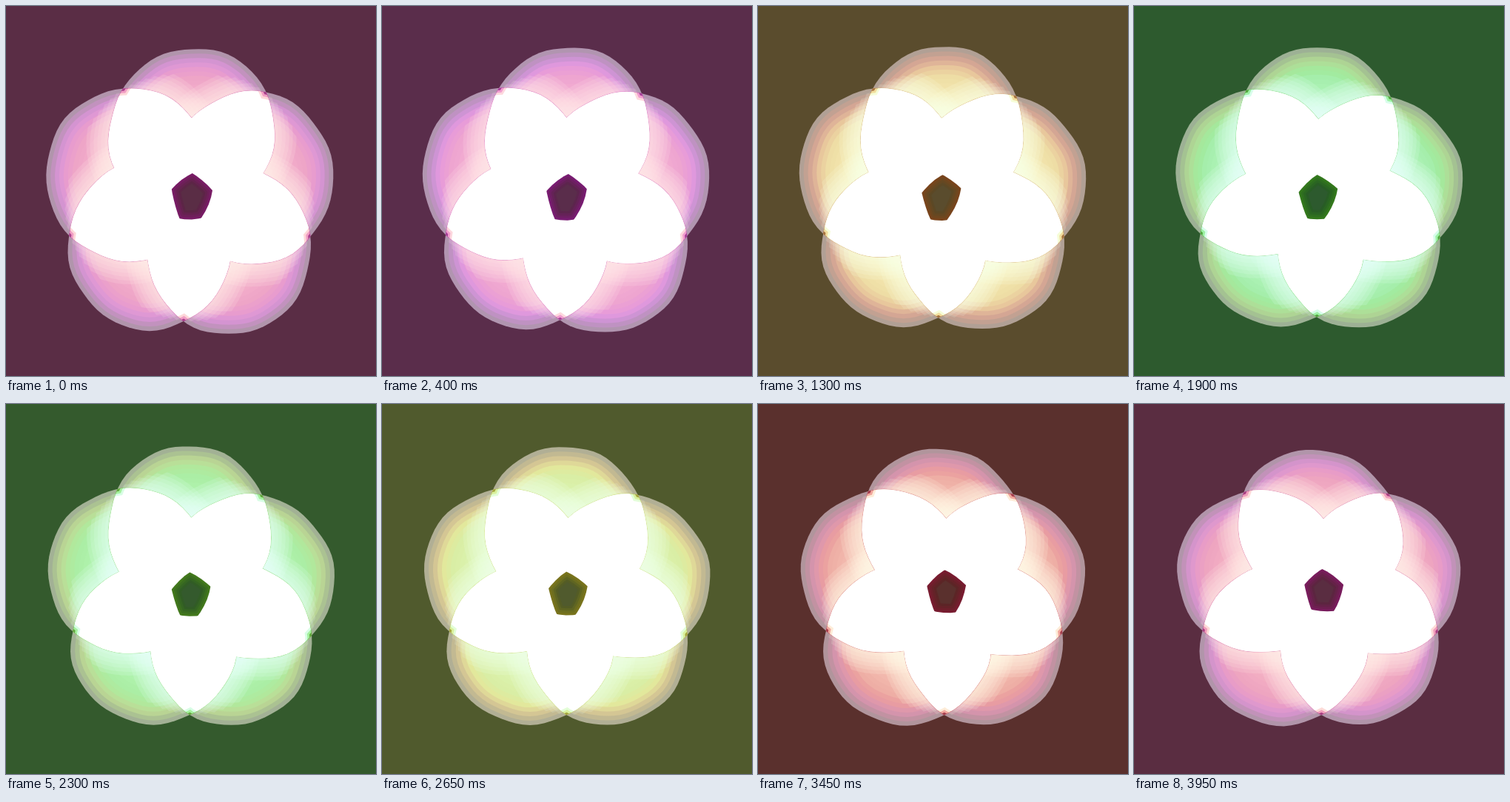
These frames come from a looping animation (500x500 px, 4 s). An HTML page with a canvas:

```html
<!DOCTYPE html>
<html lang="en">
<head>
<meta charset="utf-8">
<title>Breathing blossom</title>
<style>
  html, body { margin: 0; width: 100%; height: 100%; overflow: hidden; background: #582d44; }
  canvas { display: block; width: 500px; height: 500px; }
</style>
</head>
<body>
<canvas id="stage" width="500" height="500"></canvas>
<script>
const ctx = document.getElementById('stage').getContext('2d');
const LOOP = 4000, STEP = 50, TAU = Math.PI * 2;

const hueTimes = [0, 850, 1300, 1900, 2300, 3000, 3950];
const hues = [-32, -35, 42, 121, 111, 34, -26];

// Petals clockwise from the top: [left, top, right, bottom] at each time.
const poseTimes = [0, 850, 1900, 3950];
const petals = [
  { box: [[139, 57, 363, 287], [140, 54, 360, 289], [138, 55, 357, 287], [141, 62, 362, 279]], skew: [-2.5, -2, 0, 6] },
  { box: [[222, 115, 442, 349], [218, 118, 442, 348], [219, 122, 444, 346], [228, 122, 441, 339]], skew: [0, 1.5, 2.5, 1] },
  { box: [[190, 214, 412, 444], [190, 216, 414, 439], [194, 213, 414, 435], [198, 211, 412, 433]], skew: [0, 0, 0, 0] },
  { box: [[84, 209, 304, 438], [85, 213, 306, 434], [87, 218, 310, 432], [89, 214, 316, 434]], skew: [0, 0, 0, -2] },
  { box: [[54, 111, 280, 345], [55, 110, 276, 341], [56, 113, 277, 338], [58, 117, 285, 336]], skew: [0, 0, 0, 0] }
];

// Colour of a petal by depth from its rim: depth, hue shift, saturation, lightness.
const shades = [
  [0, -18, 15, 64], [7, -24, 30, 67], [14, -26, 47, 72], [24, -8, 62, 76],
  [36, 4, 68, 79], [60, 8, 74, 82], [85, 14, 80, 86]
];

const hsl = (h, s, l, a = 1) => `hsla(${(h + 360) % 360}, ${s}%, ${l}%, ${a})`;
const mix = (a, b, k) => a + (b - a) * k;

// Smooth curve through the given points.
function curve(times, vals, t) {
  const last = times.length - 1;
  let i = 0;
  while (i < last - 1 && t > times[i + 1]) i++;
  const slope = n => {
    const a = Math.max(n - 1, 0), b = Math.min(n + 1, last);
    return (vals[b] - vals[a]) / (times[b] - times[a]);
  };
  const span = times[i + 1] - times[i], u = (t - times[i]) / span;
  const u2 = u * u, u3 = u2 * u;
  return (2 * u3 - 3 * u2 + 1) * vals[i] + (u3 - 2 * u2 + u) * span * slope(i)
    + (3 * u2 - 2 * u3) * vals[i + 1] + (u3 - u2) * span * slope(i + 1);
}

function shadeAt(depth, hue) {
  let i = 0;
  while (i < shades.length - 2 && depth > shades[i + 1][0]) i++;
  const a = shades[i], b = shades[i + 1];
  const k = Math.min((depth - a[0]) / (b[0] - a[0]), 1);
  return hsl(hue + mix(a[1], b[1], k), mix(a[2], b[2], k), mix(a[3], b[3], k));
}

function pose(petal, n, t) {
  const [l, top, r, b] = [0, 1, 2, 3].map(k => curve(poseTimes, petal.box.map(q => q[k]), t));
  return {
    x: (l + r) / 2, y: (top + b) / 2, rx: (r - l) / 2, ry: (b - top) / 2,
    skew: curve(poseTimes, petal.skew, t), phase: n * 1.9 + t / 4000
  };
}

// Petal outline, moved inwards by the inset (outwards when negative).
function outline(p, inset = 0) {
  const path = new Path2D(), k = 1 - inset / ((p.rx + p.ry) / 2);
  for (let i = 0; i < 72; i++) {
    const a = i / 72 * TAU, c = Math.cos(a), s = Math.sin(a);
    const bump = p.skew * Math.sin(2 * a) + 0.9 * Math.sin(5 * a + p.phase) + 0.6 * Math.sin(9 * a - p.phase);
    path.lineTo(p.x + (p.rx + bump) * k * c, p.y + (p.ry + bump) * k * s);
  }
  path.closePath();
  return path;
}

function clipped(clips, draw) {
  ctx.save();
  clips.forEach(c => ctx.clip(c));
  draw();
  ctx.restore();
}

function fill(path, color) {
  ctx.fillStyle = color;
  ctx.fill(path);
}

function render(t) {
  const hue = curve(hueTimes, hues, t);
  const back = hsl(hue, 33, 26.5);
  const blobs = petals.map((p, n) => pose(p, n, t));
  const rims = blobs.map(b => outline(b));
  const pairs = [];
  blobs.forEach((_, i) => pairs.push([i, (i + 1) % 5], [(i + 1) % 5, i]));

  ctx.fillStyle = back;
  ctx.fillRect(0, 0, 500, 500);

  blobs.forEach(b => {
    for (let d = 0; d < 90; d += 6) fill(outline(b, d), shadeAt(d, hue));
  });

  // Glow beside each overlap
  for (const [i, j] of pairs) {
    for (let e = 30; e >= 5; e -= 5) {
      clipped([outline(blobs[i], e)], () => fill(outline(blobs[j], -e), hsl(hue + 42, 100, 95, 0.16)));
    }
    clipped([rims[i]], () => {
      ctx.strokeStyle = hsl(hue - 10, 60, 55, 0.4);
      ctx.lineWidth = 1.2;
      ctx.stroke(rims[j]);
    });
  }

  // Overlaps, coloured only at their tips
  for (const [i, j] of pairs) clipped([rims[i]], () => fill(rims[j], hsl(hue - 12, 45, 45)));
  for (const [depth, color] of [[3, hsl(hue + 4, 75, 78)], [6, hsl(hue + 30, 90, 92)], [9, '#fff']]) {
    for (const [i, j] of pairs) clipped([outline(blobs[i], depth)], () => fill(rims[j], color));
  }

  // Dark heart where all five petals meet
  [0, 3, 6, 9, 12].forEach((d, n) => {
    const rings = blobs.map(b => outline(b, d));
    const k = n / 4;
    clipped(rings.slice(1), () => fill(rings[0], n === 4 ? back : hsl(hue - 16 * (1 - k), mix(62, 36, k), mix(29, 24, k))));
  });
}

function tick(now) {
  render(Math.floor(now % LOOP / STEP) * STEP);
  requestAnimationFrame(tick);
}

render(0);
requestAnimationFrame(tick);
</script>
</body>
</html>
```
